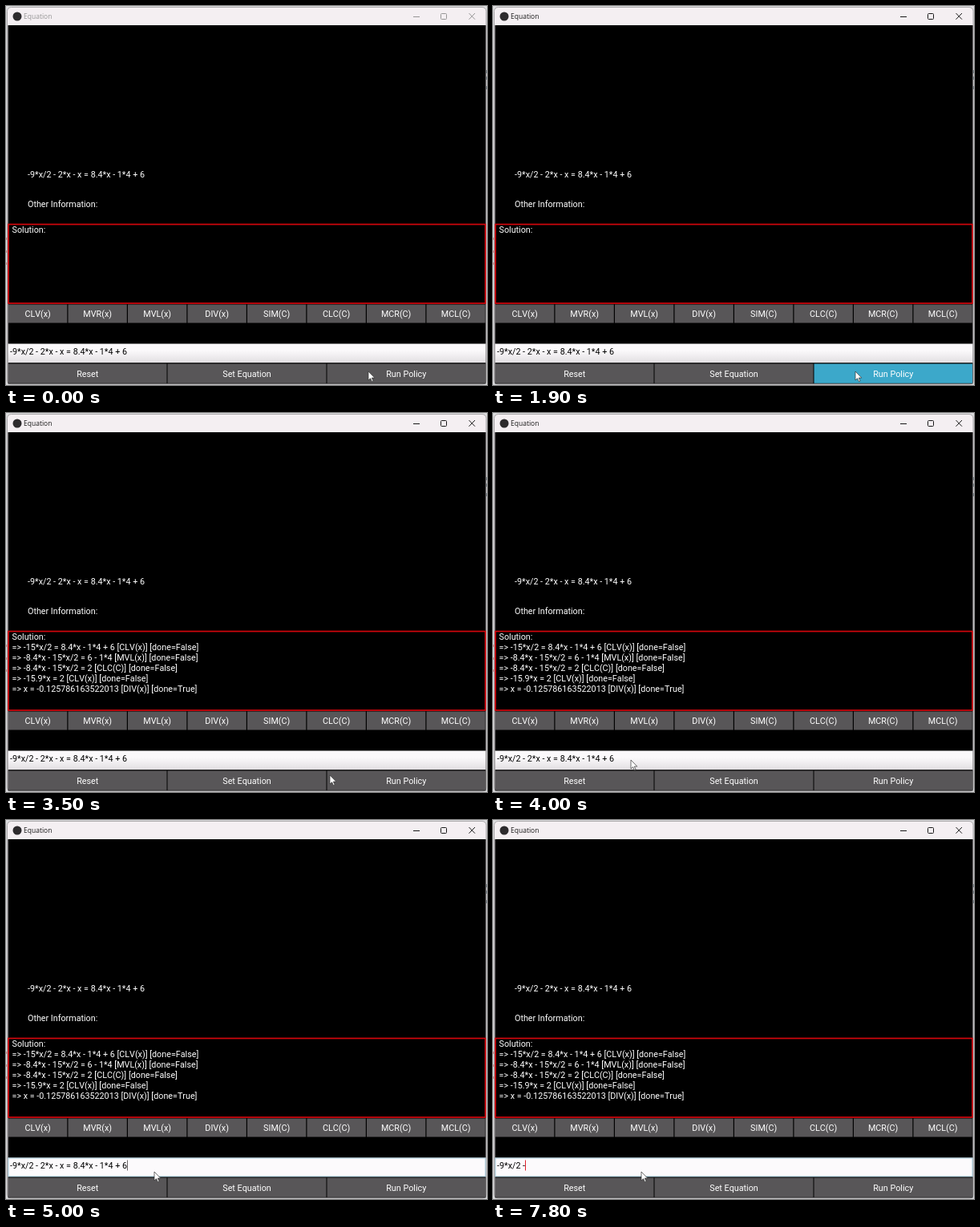
An HTML page that plays this animation: 600 by 473 pixels, repeating every 8 s.

```html
<!DOCTYPE html>
<html lang="en">
<head>
<meta charset="utf-8">
<title>Equation</title>
<style>
  html, body { margin: 0; width: 100%; height: 100%; overflow: hidden; background: #dcdcde; }
  svg { display: block; width: 600px; height: 473px; }
  text { font: 10.75px Roboto, sans-serif; font-kerning: none; white-space: pre; fill: #fff; }
  .mid { text-anchor: middle; }
  #title { font: 8.5px "Open Sans", sans-serif; }
  #entry { fill: #000; }
</style>
</head>
<body>
<svg id="stage" viewBox="0 0 600 473" xmlns="http://www.w3.org/2000/svg">
  <defs>
    <linearGradient id="idle" x2="0" y2="1">
      <stop offset="0" stop-color="#fbf9fb"/>
      <stop offset=".35" stop-color="#fbf9fb"/>
      <stop offset="1" stop-color="#e2dfe2"/>
    </linearGradient>
  </defs>
  <rect width="600" height="473" fill="#dcdcde"/>
  <g id="edges"></g>
  <rect x="1.5" y="1.5" width="597.5" height="470.5" rx="5" fill="#f4eff2" stroke="#a9a7a9"/>
  <rect x="2.5" y="24" width="596" height="447.5" fill="#000"/>

  <circle cx="14" cy="13" r="5.5" fill="#2d2b2d"/>
  <text id="title" x="22" y="16">Equation</text>
  <g id="controls" fill="none" stroke-width="1">
    <path d="M508 13.5H516"/>
    <rect x="542.5" y="9.5" width="7" height="7" rx="1"/>
    <path d="M577.5 9L585 16.7M585 9L577.5 16.7"/>
  </g>

  <g id="labels"></g>
  <rect x="3" y="272.5" width="595" height="98.5" fill="none" stroke="#d3060c" stroke-width="1.7"/>
  <g id="solution"></g>
  <g id="buttons"></g>

  <rect x="2.5" y="421.5" width="596" height="23.7" fill="url(#idle)"/>
  <rect id="focus" x="3" y="422" width="595" height="22.8" fill="#fcfafc" stroke="#a9cfe0"/>
  <text id="entry" x="5" y="435"></text>
  <rect id="caret" y="424.5" width="1" height="13"/>
  <path id="pointer" d="M0 0V11L2.6 8.7L4.4 12.7L6.1 12L4.3 8.1H7.8Z"
        fill="#fff" stroke="#333" stroke-width=".7" stroke-linejoin="round"/>
</svg>
<script>
const LOOP = 8000;
const EQUATION = "-9*x/2 - 2*x - x = 8.4*x - 1*4 + 6";
const STEPS = [
  "-15*x/2 = 8.4*x - 1*4 + 6 [CLV(x)] [done=False]",
  "-8.4*x - 15*x/2 = 6 - 1*4 [MVL(x)] [done=False]",
  "-8.4*x - 15*x/2 = 2 [CLC(C)] [done=False]",
  "-15.9*x = 2 [CLV(x)] [done=False]",
  "x = -0.125786163522013 [DIV(x)] [done=True]"
];
const ACTIONS = ["CLV(x)", "MVR(x)", "MVL(x)", "DIV(x)", "SIM(C)", "CLC(C)", "MCR(C)", "MCL(C)"];

// [time, x, y] of the pointer tip
const PATH = [
  [0, 452, 456], [3400, 440, 455], [3500, 404, 452], [3600, 348, 447],
  [3700, 284, 442], [3800, 226, 438], [3900, 187, 435], [4000, 172, 433],
  [4100, 182, 427], [4200, 197, 424], [4300, 197, 426], [4400, 194, 430],
  [4500, 190, 434], [4600, 187, 437], [4700, 185, 439]
];
// [time, characters left in the entry]
const TYPING = [
  [0, 34], [6300, 33], [6800, 30], [6900, 27], [7000, 24], [7100, 20],
  [7200, 17], [7300, 14], [7400, 11], [7700, 9], [7800, 8]
];

const $ = id => document.getElementById(id);

function add(parent, tag, attrs, content = "") {
  const el = document.createElementNS("http://www.w3.org/2000/svg", tag);
  for (const key in attrs) el.setAttribute(key, attrs[key]);
  el.textContent = content;
  $(parent).append(el);
  return el;
}

function button(x, y, w, h, label) {
  const face = add("buttons", "rect", { x, y, width: w, height: h, fill: "#585658" });
  add("buttons", "text", { x: x + w / 2, y: y + h / 2 + 4, class: "mid" }, label);
  return face;
}

const at = (table, t) => table.findLast(row => row[0] <= t);
const show = (el, on) => el.setAttribute("visibility", on ? "visible" : "hidden");

add("labels", "text", { x: 27, y: 214 }, EQUATION);
add("labels", "text", { x: 27, y: 251 }, "Other Information:");
add("labels", "text", { x: 7.5, y: 283 }, "Solution:");
STEPS.forEach((s, i) => add("solution", "text", { x: 7.5, y: 296 + i * 12.9 }, "=> " + s));
ACTIONS.forEach((s, i) => button(3 + i * 74.5, 372.5, 73.3, 23, s));
button(3, 446.5, 197.5, 24.3, "Reset");
button(201.5, 446.5, 198, 24.3, "Set Equation");
const run = button(400.5, 446.5, 197.5, 24.3, "Run Policy");

for (const y of [289, 305, 320]) add("edges", "rect", { x: 0, y, width: 1, height: 3, fill: "#d58a8a" });
for (const y of [80, 88, 100]) add("edges", "rect", { x: 599, y, width: 1, height: 4, fill: "#3c5560" });

function draw(t) {
  const fade = Math.min(1, Math.max(0, Math.floor(t / 100) / 4));
  const grey = Math.round(150 - 125 * fade);
  const ink = `rgb(${grey},${grey},${grey})`;
  $("title").style.fill = ink;
  $("controls").setAttribute("stroke", ink);

  run.setAttribute("fill", t >= 1900 && t < 2300 ? "#3ca8ca" : "#585658");
  show($("solution"), t >= 2300);

  const [, x, y] = at(PATH, t);
  $("pointer").setAttribute("transform", `translate(${x} ${y})`);

  const entry = $("entry");
  entry.textContent = EQUATION.slice(0, at(TYPING, t)[1]);
  show($("focus"), t >= 4900);
  const caret = $("caret");
  show(caret, t >= 4900 && !(t >= 5400 && t < 5900));
  caret.setAttribute("x", Math.round(5 + entry.getComputedTextLength()));
  caret.setAttribute("fill", t < 6800 ? "#6b6567" : "#e0202a");
}

const start = performance.now();
function tick() {
  draw((performance.now() - start) % LOOP);
  requestAnimationFrame(tick);
}
tick();
</script>
</body>
</html>
```
